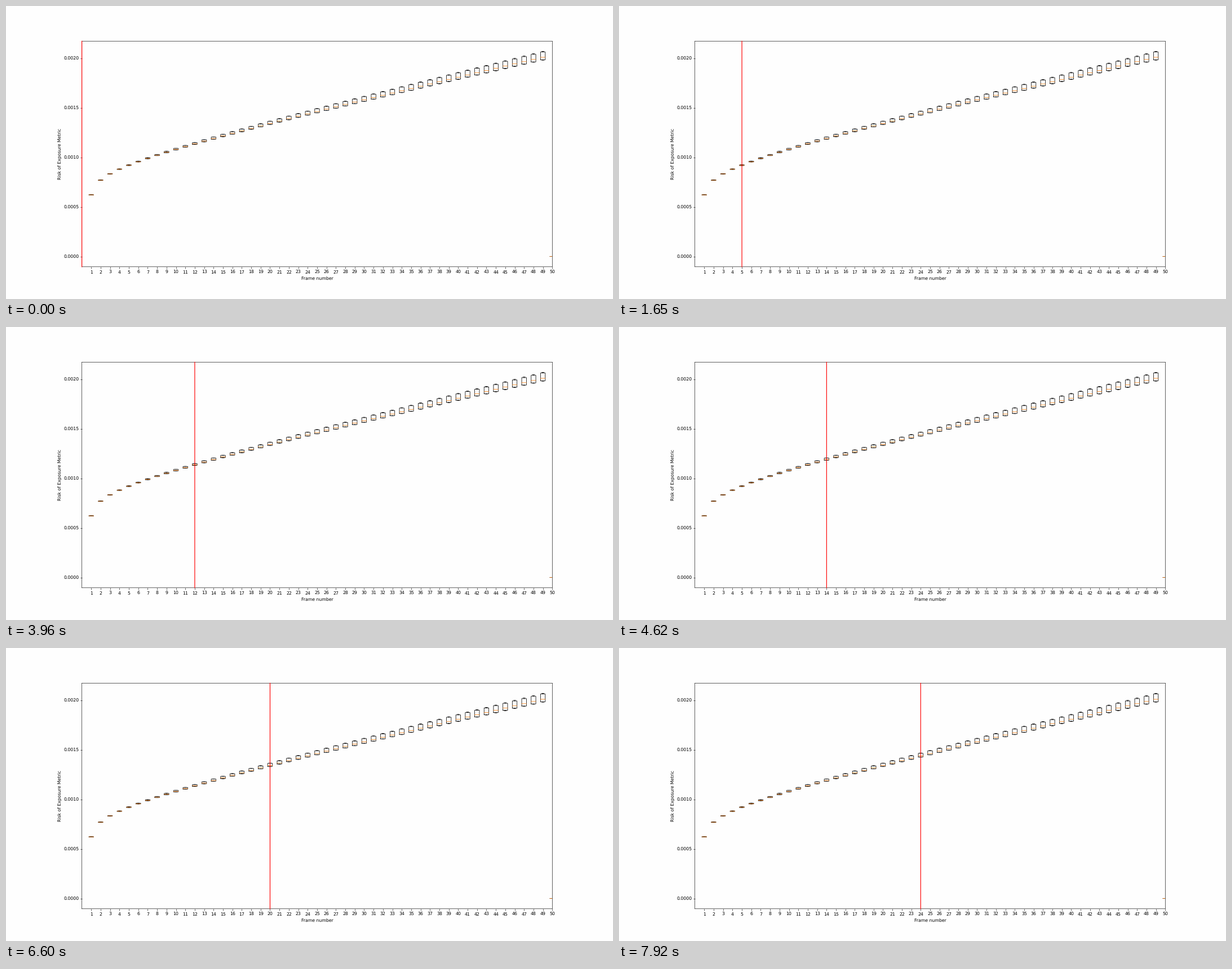
A matplotlib script that plays this animation: 1077 by 520 pixels, repeating every 8 s.

```python
import numpy as np
import matplotlib.pyplot as plt
from matplotlib.animation import FuncAnimation

WIDTH, HEIGHT, DPI = 1077, 520, 72
SCALE = WIDTH / 1920 * 100 / DPI   # default style sizes shrunk to the stage
LOOP, INTERVAL, STEP = 8000, 40, 330
UNIT = 1e-5
PAPER = "#fefefe"

plt.rcParams.update({
    "font.family": "DejaVu Sans",
    "font.size": 10 * SCALE,
    "text.hinting": "none",
    "axes.linewidth": 0.8 * SCALE,
    "axes.labelpad": 4 * SCALE,
    "axes.facecolor": PAPER,
    "figure.facecolor": PAPER,
    "path.simplify": False,
})
for axis, extra in (("xtick", 1), ("ytick", 0)):
    plt.rcParams.update({
        f"{axis}.major.size": 3.5 * SCALE,
        f"{axis}.major.pad": 3.5 * SCALE + extra,
        f"{axis}.major.width": 0.8 * SCALE,
    })

# Fast early rise that settles into a straight climb with growing spread;
# the last box is empty and sits at zero
pos = np.arange(1, 51)
filled = pos < 50
q1 = 68.8 + 1.995 * pos + 8.2 * np.log(pos) - 8.6 / pos ** 2.5
q1 = np.where(filled, q1, 0) * UNIT
height = np.where(filled, 0.162 * (pos - 1), 0) * UNIT
q3 = q1 + height
median = q1 + 0.32 * height
low = q1 - 0.05 * height
high = q3 + 0.08 * height

fig, ax = plt.subplots(figsize=(WIDTH / DPI, HEIGHT / DPI), dpi=DPI)
fig.subplots_adjust(left=0.125, right=0.9, bottom=0.11, top=0.88)
for spine in ax.spines.values():
    spine.set_snap(False)


def strokes(xs, ys, color="black"):
    """Draw one polyline per box as a single line with gaps."""
    gap = np.full(len(pos), np.nan)
    x = np.column_stack([pos + dx for dx in xs] + [gap]).ravel()
    y = np.column_stack(list(ys) + [gap]).ravel()
    ax.plot(x, y, color=color, lw=SCALE, solid_capstyle="projecting",
            solid_joinstyle="round", snap=False)


strokes([-0.25, 0.25, 0.25, -0.25, -0.25], [q1, q1, q3, q3, q1])
for edge, end in ((q1, low), (q3, high)):
    strokes([0, 0], [edge, end])
    strokes([-0.125, 0.125], [end, end])
strokes([-0.25, 0.25], [median, median], "#ff7f0e")

margin = 0.05 * high.max()
ax.set_xlim(0, 50)
ax.set_ylim(-margin, high.max() + margin)
ax.set_xticks(pos)
ax.set_yticks(np.arange(5) * 0.0005)
ax.yaxis.set_major_formatter("{x:.4f}")
ax.set_xlabel("Frame number")
ax.set_ylabel("Risk of Exposure Metric")

cursor = ax.axvline(0, color="red", lw=1.5 * SCALE, zorder=3,
                    clip_on=False, snap=False)


def update(frame):
    x = (frame * INTERVAL + 30) // STEP
    cursor.set_xdata([x, x])
    return cursor,


anim = FuncAnimation(fig, update, frames=LOOP // INTERVAL, interval=INTERVAL,
                     repeat=True, repeat_delay=0, blit=False)
plt.show()
```
